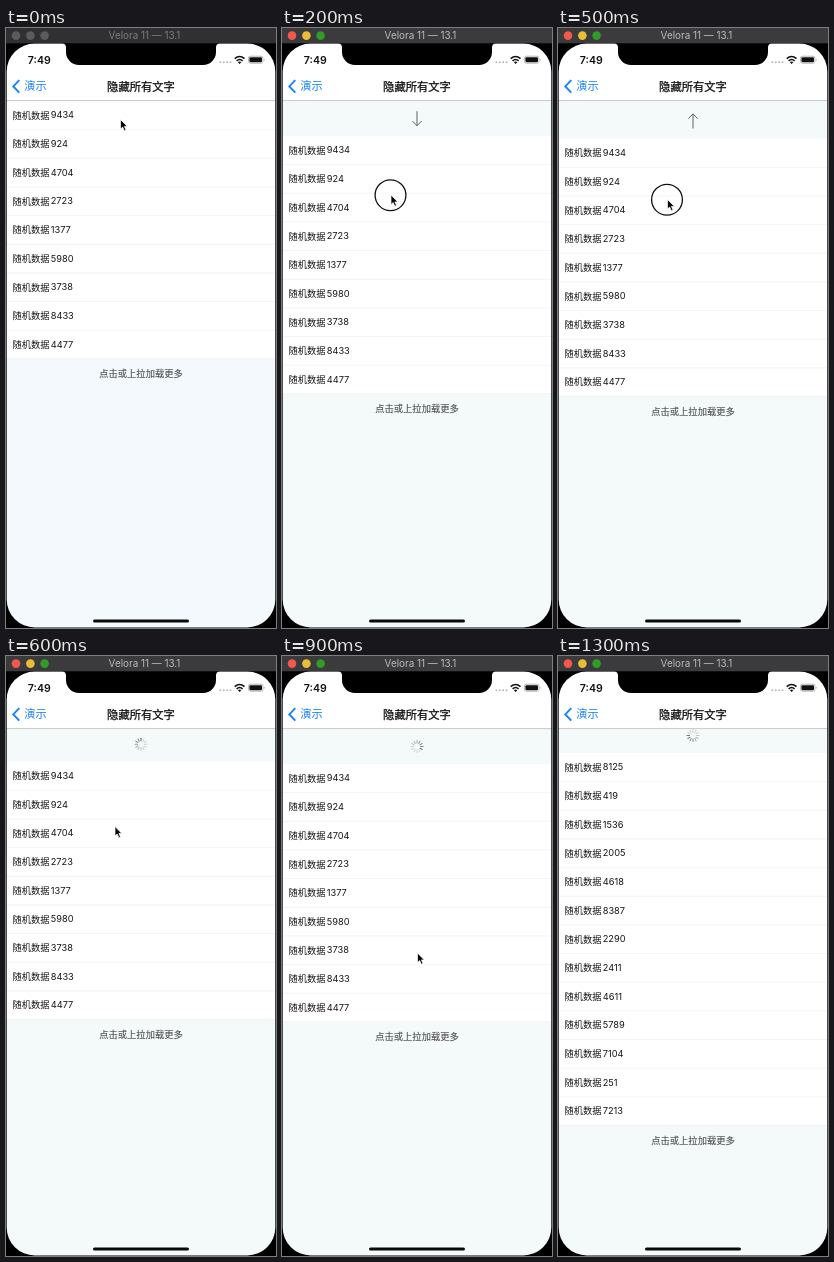
Write an HTML page that moves like this. It is 270 px wide and 600 px high and loops after 1400 ms.

```html
<!DOCTYPE html>
<html lang="zh-CN">
<head>
<meta charset="utf-8">
<title>下拉刷新</title>
<style>
html, body { margin: 0; width: 100%; height: 100%; overflow: hidden; background: #000; }
svg { display: block; width: 270px; height: 600px; }
text { font-family: Inter, "Noto Sans CJK SC", "Noto Sans CJK", sans-serif; }
.cjk { font-family: "Noto Sans CJK SC", "Noto Sans CJK", sans-serif; }
</style>
</head>
<body>
<svg viewBox="0 0 270 600">
  <rect id="back" y="15" width="270" height="585"/>

  <g id="list">
    <g id="header" transform="translate(135 -17.5)">
      <path id="arrow" d="M0-7.3V7.3M-4.6 2.6L0 7.3L4.6 2.6" fill="none" stroke="#606060"/>
      <g id="spinner" stroke="#777" stroke-width="1.1" stroke-linecap="round"/>
    </g>
    <g id="rows"></g>
    <text id="more" class="cjk" x="135" text-anchor="middle" font-size="9.3" fill="#505050" stroke="#505050" stroke-width=".12">点击或上拉加载更多</text>
  </g>

  <rect y="15" width="270" height="57.5" fill="#fff"/>
  <path d="M0 72.6H270" stroke="#c4c4c6" stroke-width=".9"/>
  <path d="M13.3 52.2L7.3 58.4L13.3 64.6" fill="none" stroke="#1583f5" stroke-width="1.9"/>
  <text class="cjk" x="18.2" y="62.4" font-size="11.2" fill="#1583f5">演示</text>
  <text class="cjk" x="135" y="62.5" font-size="11.3" text-anchor="middle" fill="#0c0c0c" stroke="#0c0c0c" stroke-width=".25">隐藏所有文字</text>

  <text x="21.8" y="36" font-size="10.6" font-weight="600" fill="#111">7:49</text>
  <g fill="#b8b8b8">
    <circle cx="214.3" cy="34.3" r="1"/><circle cx="217.7" cy="34.3" r="1"/>
    <circle cx="221.1" cy="34.3" r="1"/><circle cx="224.5" cy="34.3" r="1"/>
  </g>
  <g fill="none" stroke="#111" stroke-width="1.6">
    <path d="M228.7 30.6Q233.6 26.4 238.5 30.6"/>
    <path d="M230.6 32.8Q233.6 30.2 236.6 32.8"/>
  </g>
  <path d="M231.9 34.2Q233.6 32.8 235.3 34.2L233.6 36Z" fill="#111"/>
  <rect x="242.4" y="28.2" width="14.6" height="7" rx="2" fill="none" stroke="#999" stroke-width=".7"/>
  <rect x="243.4" y="29.2" width="12.6" height="5" rx="1.1" fill="#111"/>
  <path d="M258 30.4Q259.4 31.7 258 33Z" fill="#999"/>

  <rect x="87" y="591.5" width="96" height="3" rx="1.5" fill="#0a0a0a"/>
  <path fill-rule="evenodd" d="M0 15H270V600H0ZM.7 43.5A28 28 0 0 1 28.7 15.5H56Q60 15.5 60 19.5V24A13 13 0 0 0 73 37H197A13 13 0 0 0 210 24V19.5Q210 15.5 214 15.5H241.3A28 28 0 0 1 269.3 43.5V571.5A28 28 0 0 1 241.3 599.5H28.7A28 28 0 0 1 .7 571.5Z"/>

  <rect id="bar" width="270" height="15.3"/>
  <g id="lights">
    <circle cx="10" cy="7.6" r="4.3"/><circle cx="24.4" cy="7.6" r="4.3"/><circle cx="38.6" cy="7.6" r="4.3"/>
  </g>
  <text id="caption" x="138.5" y="11.4" font-size="9.9" text-anchor="middle">Velora 11 — 13.1</text>

  <circle id="ring" r="15.4" fill="#fff" fill-opacity=".25" stroke="#111" stroke-width="1.3"/>
  <path id="cursor" d="M0 0V9.6L2.2 7.6L3.8 11.2L5.5 10.4L3.9 6.9H6.8Z" fill="#080808" stroke="#fff" stroke-width=".7"/>
</svg>
<script>
const LOOP = 1400, STEP = 100, ROW = 28.65, TOP = 73;
const OLD = [9434, 924, 4704, 2723, 1377, 5980, 3738, 8433, 4477];
const NEW = [8125, 419, 1536, 2005, 4618, 8387, 2290, 2411, 4611, 5789, 7104, 251, 7213];
const LIGHTS = ['#f4574c', '#e9bd35', '#329b27'];

// Keyframes: [time, value, ...]
const PULL = [[0, 0], [100, 16], [200, 35], [300, 36.6], [500, 37.7], [600, 32.7], [700, 34.4], [800, 35], [1200, 35], [1300, 24]];
const POINTER = [[0, 114.5, 91.5], [100, 111.5, 126], [200, 109, 167], [300, 109.2, 169.5], [500, 109.5, 171.5], [600, 109, 170.5],
  [700, 112, 193], [800, 121, 240], [900, 135.5, 297], [1000, 164, 390], [1100, 198, 490], [1200, 225.5, 576]];
const TURN = [[200, 0], [300, 20], [400, 125], [500, 180]];

const $ = id => document.getElementById(id);
const set = (el, attrs) => { for (const k in attrs) el.setAttribute(k, attrs[k]); };
const show = (el, on) => set(el, { visibility: on ? 'visible' : 'hidden' });

function add(parent, tag, attrs, text = '') {
  const el = document.createElementNS('http://www.w3.org/2000/svg', tag);
  set(el, attrs);
  el.textContent = text;
  parent.append(el);
  return el;
}

function at(keys, t) {
  const i = keys.findIndex(k => k[0] >= t);
  if (i < 0) return keys[keys.length - 1].slice(1);
  if (i === 0) return keys[0].slice(1);
  const a = keys[i - 1], b = keys[i], p = (t - a[0]) / (b[0] - a[0]);
  return a.slice(1).map((v, n) => v + (b[n + 1] - v) * p);
}

function makeRows(data) {
  const g = add($('rows'), 'g', {});
  add(g, 'rect', { width: 270, height: data.length * ROW, fill: '#fff' });
  data.forEach((n, i) => {
    const y = i * ROW;
    add(g, 'text', { class: 'cjk', x: 6.6, y: y + 17.6, 'font-size': 9.25, fill: '#161616' }, '随机数据');
    add(g, 'text', { x: 44.7, y: y + 17.4, 'font-size': 9.25, fill: '#161616' }, n);
    add(g, 'path', { d: `M0 ${y + ROW}H270`, stroke: '#eeeff0', 'stroke-width': .7 });
  });
  return g;
}

const oldRows = makeRows(OLD), newRows = makeRows(NEW);
const spokes = Array.from({ length: 12 }, (_, i) =>
  add($('spinner'), 'path', { d: 'M0-3.5V-6', transform: `rotate(${i * 30})` }));

function draw(t) {
  const active = t >= 100, loading = t >= 600, fresh = t >= 1300;
  const [pull] = at(PULL, t), [x, y] = at(POINTER, t);

  set($('back'), { fill: active ? '#f4fafa' : '#f3f9fc' });
  set($('bar'), { fill: active ? '#3b3b3d' : '#303033' });
  set($('caption'), { fill: active ? '#bcbcbc' : '#7c7c7e' });
  [...$('lights').children].forEach((c, i) => set(c, { fill: active ? LIGHTS[i] : '#5b5b5d' }));

  set($('list'), { transform: `translate(0 ${TOP + pull})` });
  show(oldRows, !fresh);
  show(newRows, fresh);
  set($('more'), { y: (fresh ? NEW : OLD).length * ROW + 18.5 });

  show($('arrow'), !loading);
  set($('arrow'), { transform: `rotate(${at(TURN, t)[0]})` });
  show($('spinner'), loading);
  const head = Math.round((120 + (t - 900) * .36) / 30);
  spokes.forEach((s, i) => {
    const age = ((head - i) % 12 + 12) % 12;
    set(s, { opacity: Math.max(.28, 1 - age * .1) });
  });

  show($('ring'), active && !loading);
  set($('ring'), { cx: x - .5, cy: y + .2 });
  show($('cursor'), !fresh);
  set($('cursor'), { transform: `translate(${x} ${y})` });
}

const start = performance.now();
function tick() {
  const t = (performance.now() - start) % LOOP;
  draw(Math.floor(t / STEP) * STEP);
  requestAnimationFrame(tick);
}
tick();
</script>
</body>
</html>
```
